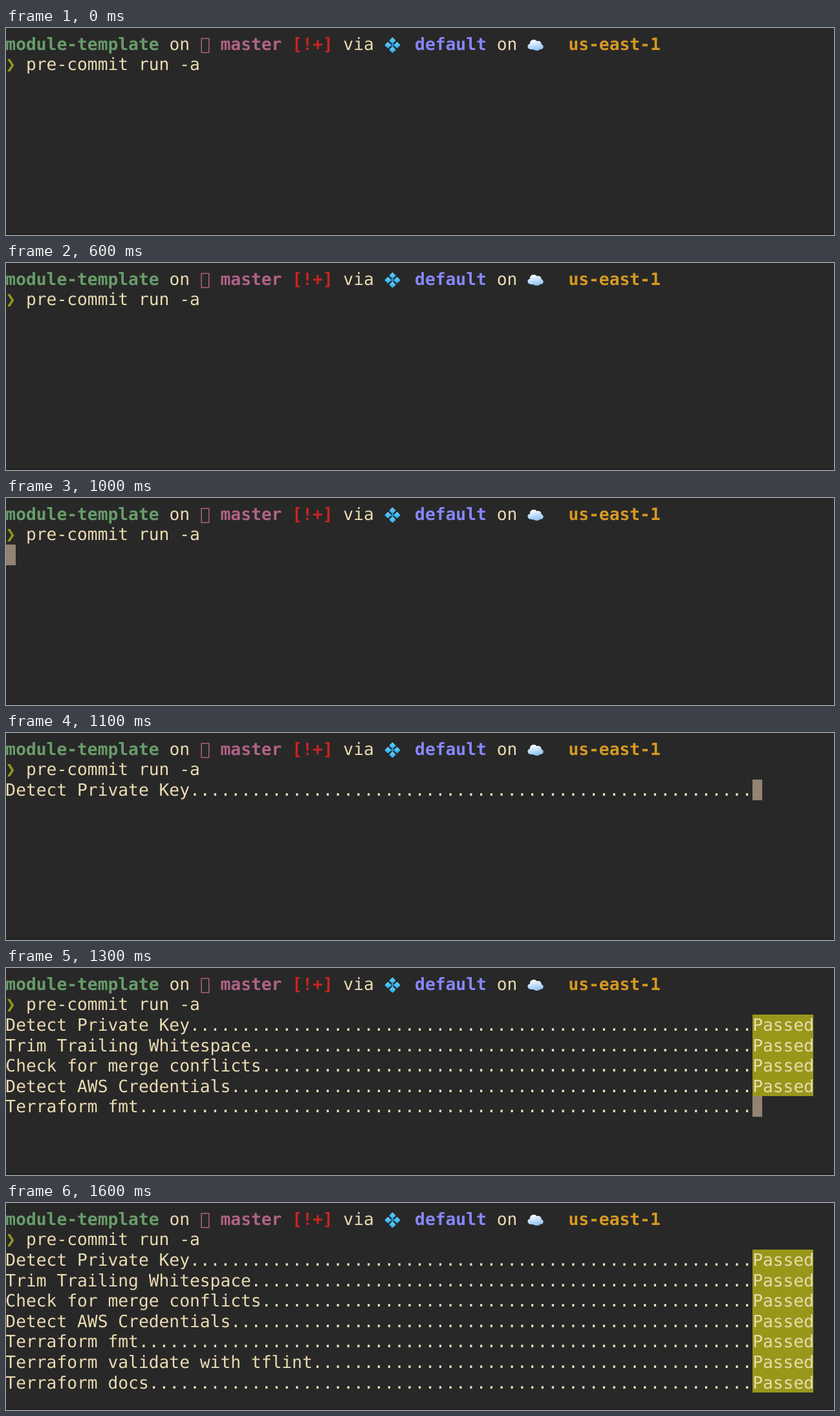
Recreate the animation shown at these times as an HTML page. Size 1280x320 px, loop 2500 ms.

```html
<!DOCTYPE html>
<html lang="en">
<head>
<meta charset="utf-8">
<title>Terminal</title>
<style>
  html, body { margin: 0; width: 100%; height: 100%; overflow: hidden; background: #282828; }
  svg { display: block; }
  text {
    font: 26.277px "DejaVu Sans Mono", monospace;
    white-space: pre;
    text-rendering: geometricPrecision;
    fill: #ebdbb2;
  }
  .bold { font-weight: bold; }
  .block { shape-rendering: crispEdges; }
</style>
</head>
<body>
<svg id="stage" width="1280" height="320" viewBox="0 0 1280 320">
  <defs>
    <linearGradient id="sky" x1="0" y1="0" x2="0.3" y2="1">
      <stop offset="0.15" stop-color="#fafdff"/>
      <stop offset="1" stop-color="#90c4f3"/>
    </linearGradient>
    <linearGradient id="gem" x1="0" y1="0" x2="1" y2="1">
      <stop offset="0" stop-color="#6fd3fb"/>
      <stop offset="1" stop-color="#1fa9ee"/>
    </linearGradient>
    <rect id="petal" x="-3.7" y="-3.7" width="7.4" height="7.4" rx="1" fill="url(#gem)" transform="rotate(45)"/>
  </defs>

  <!-- four-petal diamond -->
  <g transform="translate(597.5 26.5)">
    <use href="#petal" y="-7"/><use href="#petal" x="7"/>
    <use href="#petal" y="7"/><use href="#petal" x="-7"/>
    <path d="M0-3L3 0L0 3L-3 0Z" fill="#1c8fd6"/>
  </g>

  <!-- cloud -->
  <path fill="url(#sky)" d="M812 33C805 33 805 25 810 24.5C809 18 818 16 820.5 20.5C825 19 828 22 827.5 25C832 26 832 33 826 33C823 35.500 818 35.500 816 33.500Z"/>

  <path d="M0 319H1280" stroke="#222" stroke-width="2"/>
</svg>
<script>
const LEFT = -1.3, TOP = 8.7, CELL_W = 15.82, CELL_H = 31.6;
const BEARING = 0.6, ASCENT = 25;  // text origin inside a cell
const RESULT_COL = 73, LOOP = 2500;
const stage = document.getElementById('stage');

const colX = col => LEFT + col * CELL_W;
const rowY = row => TOP + row * CELL_H;

function add(parent, tag, attrs) {
  const node = document.createElementNS('http://www.w3.org/2000/svg', tag);
  for (const key in attrs) node.setAttribute(key, attrs[key]);
  return parent.appendChild(node);
}

function write(parent, col, row, string, color, bold) {
  const node = add(parent, 'text', { x: colX(col) + BEARING, y: rowY(row) + ASCENT });
  node.textContent = string;
  if (color) node.style.fill = color;
  if (bold) node.classList.add('bold');
}

function block(parent, col, row, cols, fill) {
  return add(parent, 'rect', {
    class: 'block', x: colX(col), y: rowY(row), width: cols * CELL_W, height: CELL_H, fill
  });
}

write(stage, 0, 0, 'module-template', '#689d6a', true);
write(stage, 16, 0, 'on');
write(stage, 19, 0, '\ue0a0 master', '#b16286', true);  // branch sign
write(stage, 28, 0, '[!+]', '#cc241d', true);
write(stage, 33, 0, 'via');
write(stage, 40, 0, 'default', '#8787ff', true);
write(stage, 48, 0, 'on');
write(stage, 55, 0, 'us-east-1', '#d79921', true);
write(stage, 0, 1, '❯', '#98971a');
write(stage, 2, 1, 'pre-commit run -a');

const checks = [
  'Detect Private Key', 'Trim Trailing Whitespace', 'Check for merge conflicts',
  'Detect AWS Credentials', 'Terraform fmt', 'Terraform validate with tflint',
  'Terraform docs'
].map((name, i) => {
  const line = add(stage, 'g'), result = add(stage, 'g');
  write(line, 0, i + 2, name.padEnd(RESULT_COL, '.'));
  block(result, RESULT_COL, i + 2, 6, '#98971a');
  write(result, RESULT_COL, i + 2, 'Passed');
  return { line, result };
});
const cursor = block(stage, 0, 0, 1, '#928374');

// start time, lines shown, results shown, cursor column and row (if visible)
const steps = [
  [0, 0, 0],
  [100, 0, 0, 19, 1],
  [600, 0, 0],
  [800, 0, 0, 19, 1],
  [1000, 0, 0, 0, 2],
  [1100, 1, 0, RESULT_COL, 2],
  [1200, 3, 2, RESULT_COL, 4],
  [1300, 5, 4, RESULT_COL, 6],
  [1500, 6, 5],
  [1600, 7, 7]
];

const show = (node, on) => node.setAttribute('visibility', on ? 'visible' : 'hidden');

function draw(now) {
  const time = now % LOOP;
  const [, lines, results, col, row] = steps.findLast(step => step[0] <= time);
  checks.forEach((check, i) => {
    show(check.line, i < lines);
    show(check.result, i < results);
  });
  show(cursor, row !== undefined);
  if (row !== undefined) {
    cursor.setAttribute('x', colX(col));
    cursor.setAttribute('y', rowY(row));
  }
}

const start = performance.now();
function tick() {
  draw(performance.now() - start);
  requestAnimationFrame(tick);
}
tick();
</script>
</body>
</html>
```
